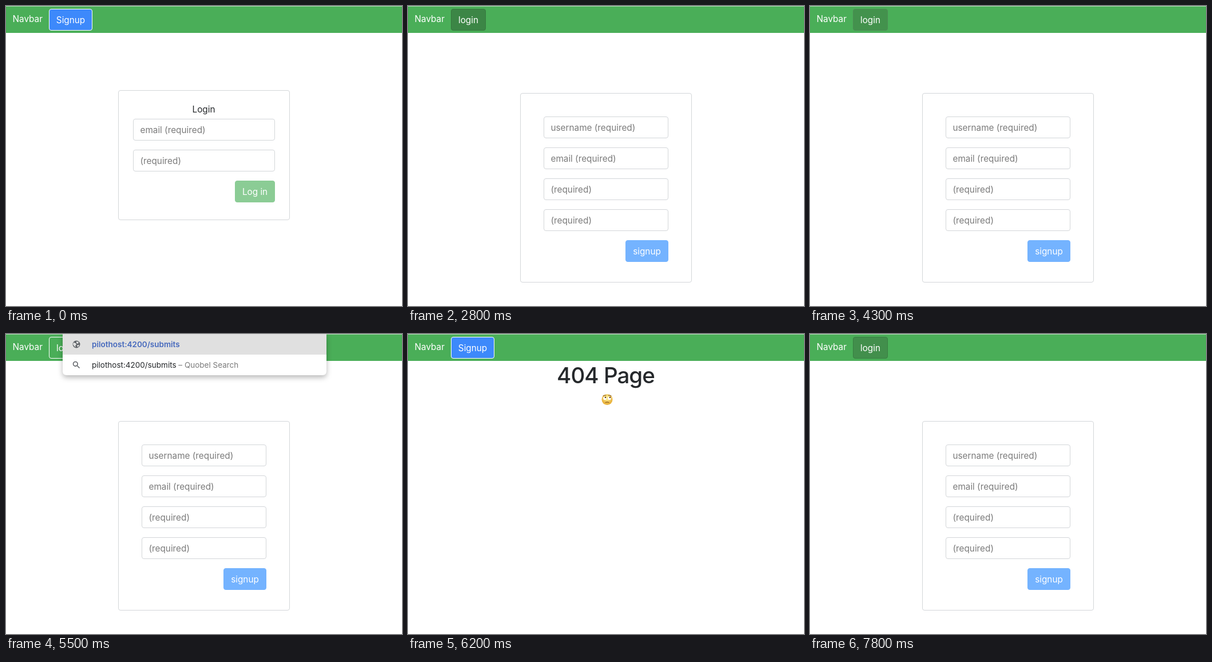
Animation of 692x524 px, one loop 8000 ms. Source, as an HTML page:

```html
<!DOCTYPE html>
<html lang="en">
<head>
<meta charset="utf-8">
<title>Login and signup</title>
<style>
  html, body { margin: 0; width: 100%; height: 100%; overflow: hidden; background: #fff; }
  svg { display: block; width: 692px; height: 524px; font: 15.3px Inter, sans-serif; }
  .field { fill: #fff; stroke: #d3d6d9; }
  .hint { fill: #7b7b7b; }
  .white { fill: #fff; }
  .dark { fill: #25282b; }
  .heading { font-size: 38.5px; font-weight: 500; letter-spacing: -.025em; }
  .menu { font-size: 13.5px; }
  .address { font-weight: 600; fill: #4669bd; }
  .shadow { filter: drop-shadow(0 4px 5px rgba(0, 0, 0, .28)); }
</style>
</head>
<body>
<svg id="stage" viewBox="0 0 692 524"></svg>
<script>
const LOOP = 8000, STEP = 100;
const stage = document.getElementById('stage');

const box = (x, y, w, h, attrs) =>
  `<rect x="${x + .5}" y="${y + .5}" width="${w - 1}" height="${h - 1}" rx="3.5" ${attrs}/>`;
const label = (x, y, text, cls, anchor = 'start') =>
  `<text x="${x}" y="${y}" class="${cls}" text-anchor="${anchor}">${text}</text>`;
const field = (x, y, w, text) =>
  box(x, y, w, 38, 'class="field"') + label(x + 12.5, y + 25, text, 'hint');
const button = (x, y, w, text, color, border = color) =>
  box(x, y, w, 38, `fill="${color}" stroke="${border}"`) +
  label(x + w / 2, y + 25, text, 'white', 'middle');

const loginCard =
  box(196, 147, 300, 227, 'class="field"') +
  label(345.5, 186, 'Login', 'dark', 'middle') +
  field(222, 197, 248, 'email (required)') +
  field(222, 251, 248, '(required)') +
  button(400, 305, 70, 'Log in', '#8bcc95');

const signupCard =
  box(196, 152, 300, 331, 'class="field"') +
  ['username (required)', 'email (required)', '(required)', '(required)']
    .map((text, i) => field(237, 193 + 54 * i, 218, text)).join('') +
  button(380, 409, 75, 'signup', '#74b3ff');

const missingPage = label(345.5, 86, '404 Page', 'dark heading', 'middle') + `
  <g transform="translate(348 114.5)">
    <circle r="9.5" fill="url(#face)"/>
    <g fill="#fff"><circle cx="-4" cy="-2.2" r="2.8"/><circle cx="4" cy="-2.2" r="2.8"/></g>
    <g fill="#5b3a1e"><circle cx="-3" cy="-3.7" r="1.3"/><circle cx="5" cy="-3.7" r="1.3"/></g>
    <path d="M-7 -6.2q2.5 -2 5 -1M2 -7.2q2.5 -1 5 1M-3 5q3 -1.2 6 0"
      fill="none" stroke="#8a5a1c" stroke-width="1.1" stroke-linecap="round"/>
  </g>`;

stage.innerHTML = `
  <defs><radialGradient id="face" cy=".35">
    <stop offset=".3" stop-color="#fde98a"/><stop offset="1" stop-color="#e9b440"/>
  </radialGradient></defs>
  <rect width="692" height="524" fill="#fff"/>
  <rect width="692" height="47" fill="#4aae58"/>
  <rect width="692" height="1" fill="#b4dcb9"/>
  ${label(11.5, 28, 'Navbar', 'white')}
  <g id="signupLink">${button(75, 5, 76, 'Signup', '#3d89fb', '#fff')}</g>
  <g id="loginLink">${button(75, 5, 61, 'login', '#439049')}</g>
  <g id="login">${loginCard}</g>
  <g id="signup">${signupCard}</g>
  <g id="missing">${missingPage}</g>
  <g id="menu" class="menu">
    <path class="shadow" d="M99 0H560V65q0 7 -7 7H106q-7 0 -7 -7Z" fill="#fff"/>
    <rect x="99" width="461" height="36" fill="#e0e0e0"/>
    <circle cx="123" cy="18" r="6.5" fill="#5f6368"/>
    <path d="M118 15l4 1 1 3 -2 1 1 3 -2 -1 -3 -4ZM123 13l4 1 -1 3 -3 -1ZM125 19l3 0 -2 4 -2 -2Z" fill="#e0e0e0"/>
    <g fill="none" stroke="#5f6368" stroke-width="1.6">
      <circle cx="121.3" cy="52.3" r="3.8"/><path d="M124.2 55.2l4.3 4.3"/>
    </g>
    <text x="150" y="23" class="address" id="address"></text>
    <text x="150" y="59" class="dark"><tspan id="query"></tspan><tspan class="hint"> – Quobel Search</tspan></text>
  </g>`;

const pages = [
  [0, 'login'], [1700, 'signup'], [2900, 'login'],
  [3700, 'signup'], [6100, 'missing'], [7000, 'signup']
];

const IDLE = { fill: [74, 174, 88], stroke: [255, 255, 255] };
const HOVER = { fill: [66, 143, 76], stroke: [56, 126, 65] };
const PRESSED = { fill: [60, 134, 70], stroke: [53, 120, 62] };

const get = id => document.getElementById(id);
const show = (id, on) => get(id).style.display = on ? '' : 'none';
const mix = (a, b, p) => `rgb(${a.map((v, i) => Math.round(v + (b[i] - v) * p))})`;

function draw(t) {
  const page = pages.filter(([start]) => t >= start).pop()[1];
  for (const id of ['login', 'signup', 'missing']) show(id, id === page);
  show('signupLink', page !== 'signup');
  show('loginLink', page === 'signup');

  // The pointer leaves the link after 4.2 s and returns with the last page.
  const fade = t >= 7000 ? 0 : Math.min(1, Math.max(0, (t - 4280) / 200));
  const state = t >= 2700 && t < 2900 ? PRESSED : HOVER;
  const link = get('loginLink').firstElementChild;
  for (const part of ['fill', 'stroke'])
    link.setAttribute(part, mix(state[part], IDLE[part], fade));

  const address = 'pilothost:4200/submit' + (t < 5600 ? 's' : 'ss');
  show('menu', t >= 5400 && t < 6100);
  get('address').textContent = get('query').textContent = address;
}

function tick() {
  draw(Math.floor(performance.now() % LOOP / STEP) * STEP);
  requestAnimationFrame(tick);
}
tick();
</script>
</body>
</html>
```
